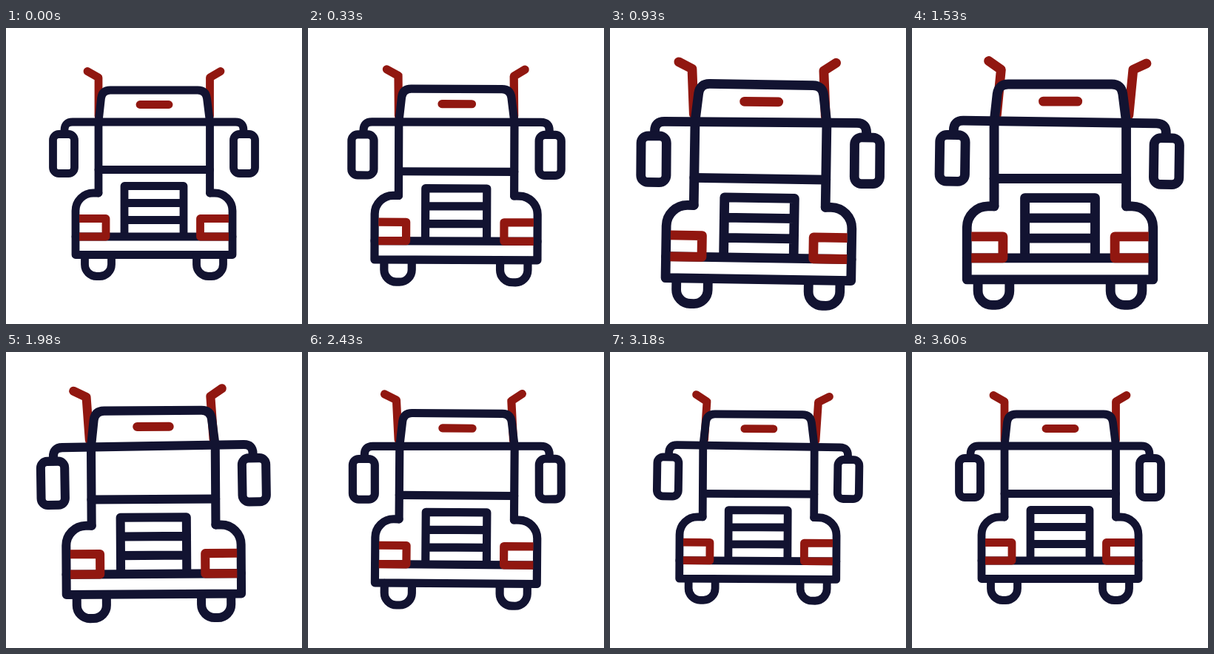
These frames come from a looping animation (400x400 px, 5630 ms). An HTML page:

```html
<!DOCTYPE html>
<html lang="en">
<head>
<meta charset="utf-8">
<title>Truck</title>
<style>
  html, body { margin: 0; width: 100%; height: 100%; overflow: hidden; background: #fff; }
  svg { display: block; width: 100%; height: 100%; }
  .dark, .red { fill: none; stroke-width: 10.8; stroke-linejoin: round; }
  .dark { stroke: #121331; stroke-linecap: round; }
  .red { stroke: #911710; }
  .butt { stroke-linecap: butt; }
  .round { stroke-linecap: round; }
</style>
</head>
<body>
<svg viewBox="0 0 400 400">
  <g id="truck">
    <g class="red round">
      <path id="pipeL" d="M110 58.500L125 67V119"/>
      <path id="pipeR" d="M290 58.500L275.500 67V119"/>
    </g>
    <g class="dark">
      <path d="M125 223V127L128.500 95Q130 84 141 84H259Q270 84 271.500 95L275.500 127V223"/>
      <path d="M125 191.500H275.500"/>
      <path d="M160 280V213.500H240V280M160 236.500H240M160 259.500H240"/>
      <path d="M125 223H118A24 24 0 0 0 94 247V306.500H306V247A24 24 0 0 0 282 223H275.500"/>
      <path d="M94 282H306"/>
      <path d="M106.500 307V319.500A16 16 0 0 0 122.500 335.500H126.500A16 16 0 0 0 142.500 319.500V307"/>
      <path d="M257.500 307V319.500A16 16 0 0 0 273.500 335.500H277.500A16 16 0 0 0 293.500 319.500V307"/>
    </g>
    <g id="mirrors" class="dark">
      <path d="M79 143V138Q79 127 90 127H310Q321 127 321 138V143"/>
      <rect x="63.500" y="143.500" width="29" height="53" rx="8"/>
      <rect x="307.500" y="143.500" width="29" height="53" rx="8"/>
    </g>
    <g class="red butt">
      <path d="M99 257.500H135V282H99"/>
      <path d="M301 257.500H262.500V282H301"/>
      <path class="round" d="M181 103.500H220"/>
    </g>
  </g>
</svg>
<script>
  const LOOP = 5630, STEP = 30, END = 3600;
  const get = id => document.getElementById(id);
  const truck = get('truck'), mirrors = get('mirrors');
  const pipeL = get('pipeL'), pipeR = get('pipeR');

  const clamp = x => Math.min(1, Math.max(0, x));
  const ease = (t, a, b) => (1 - Math.cos(Math.PI * clamp((t - a) / (b - a)))) / 2;
  const wave = deg => Math.sin(deg * Math.PI / 180);
  const turn = (el, deg, x, y) => el.setAttribute('transform', `rotate(${deg} ${x} ${y})`);

  function pose(t) {
    const grow = ease(t, 0, 1150) - ease(t, 1260, 2850);
    const shake = ease(t, 0, 150) * (1 - ease(t, 3390, END));
    const sway = wave(t * 0.4706) * shake;      // slow rocking of the body
    const rattle = wave(t * 2.162) * 6 * shake; // quick shake of the loose parts
    const scale = 1 + 0.2 * grow;
    const tilt = sway * (0.4 + 0.55 * grow);

    truck.setAttribute('transform',
      `translate(${1.9 * grow * sway} ${0.4 * sway * sway}) rotate(${tilt} 200 255) ` +
      `translate(200 127) scale(${scale}) translate(-200 -127)`);
    turn(mirrors, rattle * 0.15, 200, 127);
    turn(pipeL, rattle, 125, 148);
    turn(pipeR, rattle, 275.5, 148);
  }

  const start = performance.now();
  function tick() {
    const t = (performance.now() - start) % LOOP;
    pose(Math.min(END, Math.floor(t / STEP) * STEP));
    requestAnimationFrame(tick);
  }
  pose(0);
  requestAnimationFrame(tick);
</script>
</body>
</html>
```
